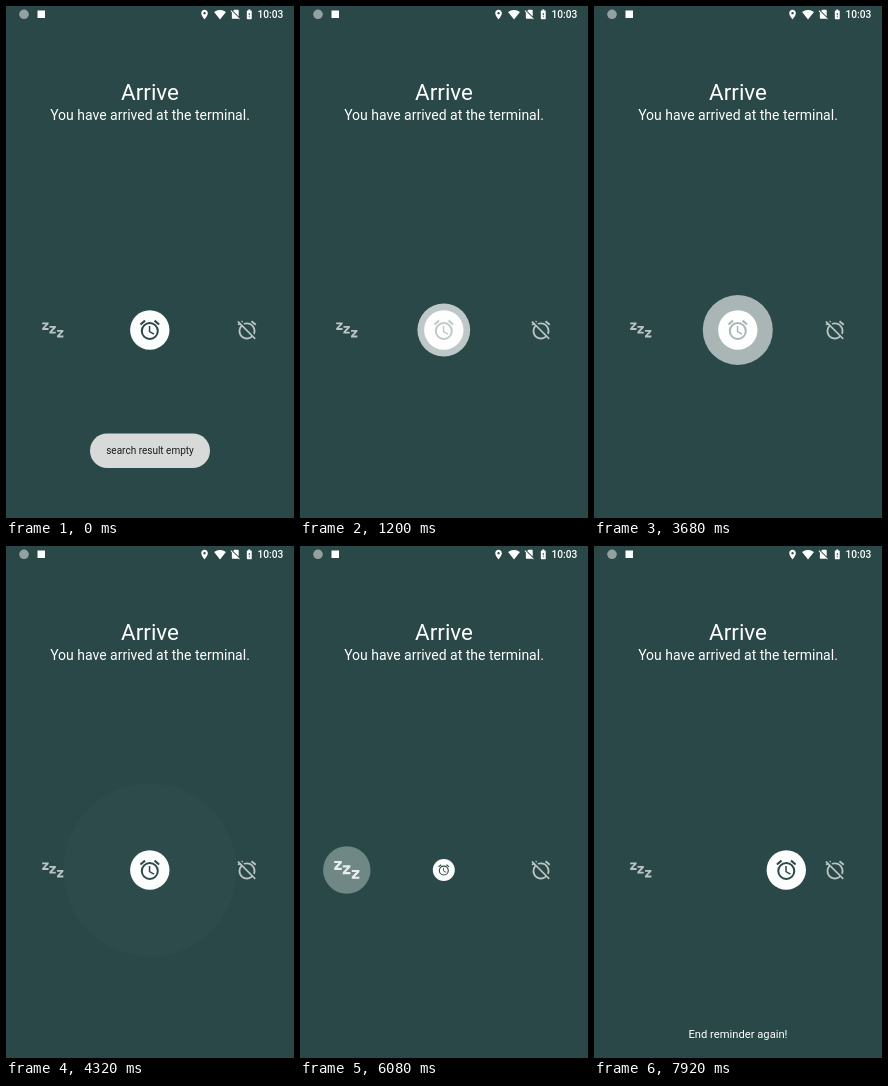
These frames come from a looping animation (288x512 px, 8000 ms). An HTML page:

```html
<!DOCTYPE html>
<html lang="en">
<head>
<meta charset="utf-8">
<title>Arrival alarm</title>
<style>
  html, body { margin: 0; width: 100%; height: 100%; overflow: hidden; background: #294847; }
  svg { display: block; width: 288px; height: 512px; }
  text { font-family: Roboto, sans-serif; fill: #fff; text-anchor: middle; }
</style>
</head>
<body>
<svg viewBox="0 0 288 512">
  <defs>
    <path id="z" d="M0 0h6.4v1.7L2.6 5.7h3.8v1.8H0V5.8l3.7-4H0z"/>
  </defs>
  <rect width="288" height="512" fill="#294847"/>

  <g fill="#fff">
    <circle cx="18" cy="8.3" r="4.8" fill="#93a1a0"/>
    <rect x="31.5" y="4.5" width="7.5" height="7.5"/>
    <path transform="translate(192.9 2.9) scale(.47)" fill-rule="evenodd" d="M12 2C8.13 2 5 5.13 5 9c0 5.25 7 13 7 13s7-7.75 7-13c0-3.87-3.13-7-7-7zm0 9.5a2.5 2.5 0 1 1 0-5 2.5 2.5 0 0 1 0 5z"/>
    <path transform="translate(207.9 2.5) scale(.51)" d="M12 21.5L23.64 7C23.2 6.66 18.7 3 12 3S.81 6.66.36 7z"/>
    <path transform="translate(223.4 2.4) scale(.49)" d="M18.99 5c0-1.1-.89-2-1.99-2h-7L7.66 5.34 19 16.68zM3.65 3.88L2.38 5.15 5 7.77V19c0 1.1.9 2 2 2h10c.35 0 .67-.1.96-.26l1.88 1.88 1.27-1.27z"/>
    <path transform="translate(237.4 2.5) scale(.49)" fill-rule="evenodd" d="M15.67 4H14V2h-4v2H8.33C7.6 4 7 4.6 7 5.33v15.33C7 21.4 7.6 22 8.33 22h7.33c.74 0 1.34-.6 1.34-1.33V5.33C17 4.6 16.4 4 15.67 4zM13 18h-2v-2h2zm0-4h-2V9h2z"/>
  </g>
  <text x="264.4" y="12.2" font-size="10.2" font-weight="500">10:03</text>

  <text x="144" y="94" font-size="22.4">Arrive</text>
  <text x="144" y="114" font-size="14">You have arrived at the terminal.</text>

  <g id="snooze">
    <circle r="28.5" fill="#f4fff8"/>
    <g class="icon" fill="#fff" transform="scale(1.4286)">
      <use href="#z" x="-10.6" y="-7.6"/>
      <use href="#z" x="-3.4" y="-4"/>
      <use href="#z" x="4.2" y="-.1"/>
    </g>
  </g>

  <g id="dismiss">
    <circle r="28.5" fill="#f4fff8"/>
    <path class="icon" fill="#fff" transform="scale(1.34) translate(-12 -12)" d="M12 6c3.87 0 7 3.13 7 7 0 .84-.16 1.65-.43 2.4l1.52 1.52c.58-1.19.91-2.51.91-3.92a9 9 0 0 0-9-9c-1.41 0-2.73.33-3.92.91L9.6 6.43C10.35 6.16 11.16 6 12 6zm10-.28l-4.6-3.86-1.29 1.53 4.6 3.86zM2.92 2.29L1.65 3.57 2.98 4.9l-1.11.93 1.42 1.42 1.11-.94.8.8A8.96 8.96 0 0 0 3 13c0 4.97 4.02 9 9 9 2.25 0 4.31-.83 5.89-2.2l2.2 2.2 1.27-1.27L3.89 3.27zm13.55 16.1C15.26 19.39 13.7 20 12 20c-3.87 0-7-3.13-7-7 0-1.7.61-3.26 1.61-4.47zM8.02 3.28L6.6 1.86l-.86.71 1.42 1.42z"/>
  </g>

  <g id="alarm">
    <circle r="19.7" fill="#fcfdfd"/>
    <path transform="translate(-12 -12)" fill="#294847" fill-rule="evenodd" d="M22 5.72l-4.6-3.86-1.29 1.53 4.6 3.86zM7.88 3.39L6.6 1.86 2 5.71l1.29 1.53zM12.5 8H11v6l4.75 2.85.75-1.23-4-2.37zM12 4a9 9 0 0 0 0 18 9 9 0 0 0 0-18zm0 16a7 7 0 0 1 0-14 7 7 0 0 1 0 14z"/>
  </g>

  <circle id="pulse" cx="143.8" cy="324" r="0" fill="#fff"/>
  <text id="hint" x="144" y="491.5" font-size="11.2">End reminder again!</text>

  <g id="toast">
    <rect x="84" y="427.5" width="120" height="34.5" rx="17.2" fill="#d8dad9"/>
    <text x="144" y="448.2" font-size="10" style="fill:#1b1d1d">search result empty</text>
  </g>
</svg>
<script>
const LOOP = 8000;
const PULSE = { starts: [866, 2084, 3302, 6758], length: 1218, radius: 88 };
const BOUNCE = { start: 7645, length: 600, shift: 48.5 };
// Drag amount over time: positive towards dismiss, negative towards snooze.
const DRAG = [[4520, 0], [5300, .54], [6260, -.54], [6650, 0]];

const $ = id => document.getElementById(id);
const [snooze, dismiss, alarm, pulse, hint, toast] =
  ['snooze', 'dismiss', 'alarm', 'pulse', 'hint', 'toast'].map($);
const clamp = v => Math.min(1, Math.max(0, v));
const smooth = u => u * u * (3 - 2 * u);

// cubic-bezier(.4, 0, .2, 1)
function standardEase(x) {
  let lo = 0, hi = 1;
  for (let i = 0; i < 24; i++) {
    const s = (lo + hi) / 2, q = 1 - s;
    if (1.2 * s * q * q + .6 * s * s * q + s ** 3 < x) lo = s; else hi = s;
  }
  return smooth(lo);
}

function dragAt(t) {
  const i = DRAG.findIndex(([time]) => t < time);
  if (i < 1) return 0;
  const [t0, a] = DRAG[i - 1], [t1, b] = DRAG[i];
  return a + (b - a) * smooth((t - t0) / (t1 - t0));
}

function place(el, x, scale) {
  el.setAttribute('transform', `translate(${x} 324) scale(${scale})`);
}

function drawSide(el, x, amount) {
  place(el, x, .7 + .3 * amount);
  el.querySelector('circle').setAttribute('opacity', .78 * amount);
  el.querySelector('.icon').setAttribute('opacity', .68 + .4 * amount);
}

function drawPulse(t) {
  const start = PULSE.starts.find(s => t >= s && t < s + PULSE.length);
  const p = start === undefined ? 1 : standardEase((t - start) / PULSE.length);
  pulse.setAttribute('r', PULSE.radius * p);
  pulse.setAttribute('opacity', t >= BOUNCE.start ? 0 : 1 - p);
}

function draw(t) {
  const drag = dragAt(t);
  drawSide(snooze, 46.8, Math.max(0, -drag));
  drawSide(dismiss, 241, Math.max(0, drag));

  const u = clamp((t - BOUNCE.start) / BOUNCE.length);
  const shift = BOUNCE.shift * (1 - Math.abs(2 * u - 1) ** 3);
  place(alarm, 143.8 + shift, 1 - Math.abs(drag));

  drawPulse(t);
  hint.setAttribute('opacity', t >= BOUNCE.start ? 1 : 0);
  toast.setAttribute('opacity', 1 - clamp((t - 30) / 480));
}

const begin = performance.now();
function tick() {
  draw((performance.now() - begin) % LOOP);
  requestAnimationFrame(tick);
}
tick();
</script>
</body>
</html>
```
